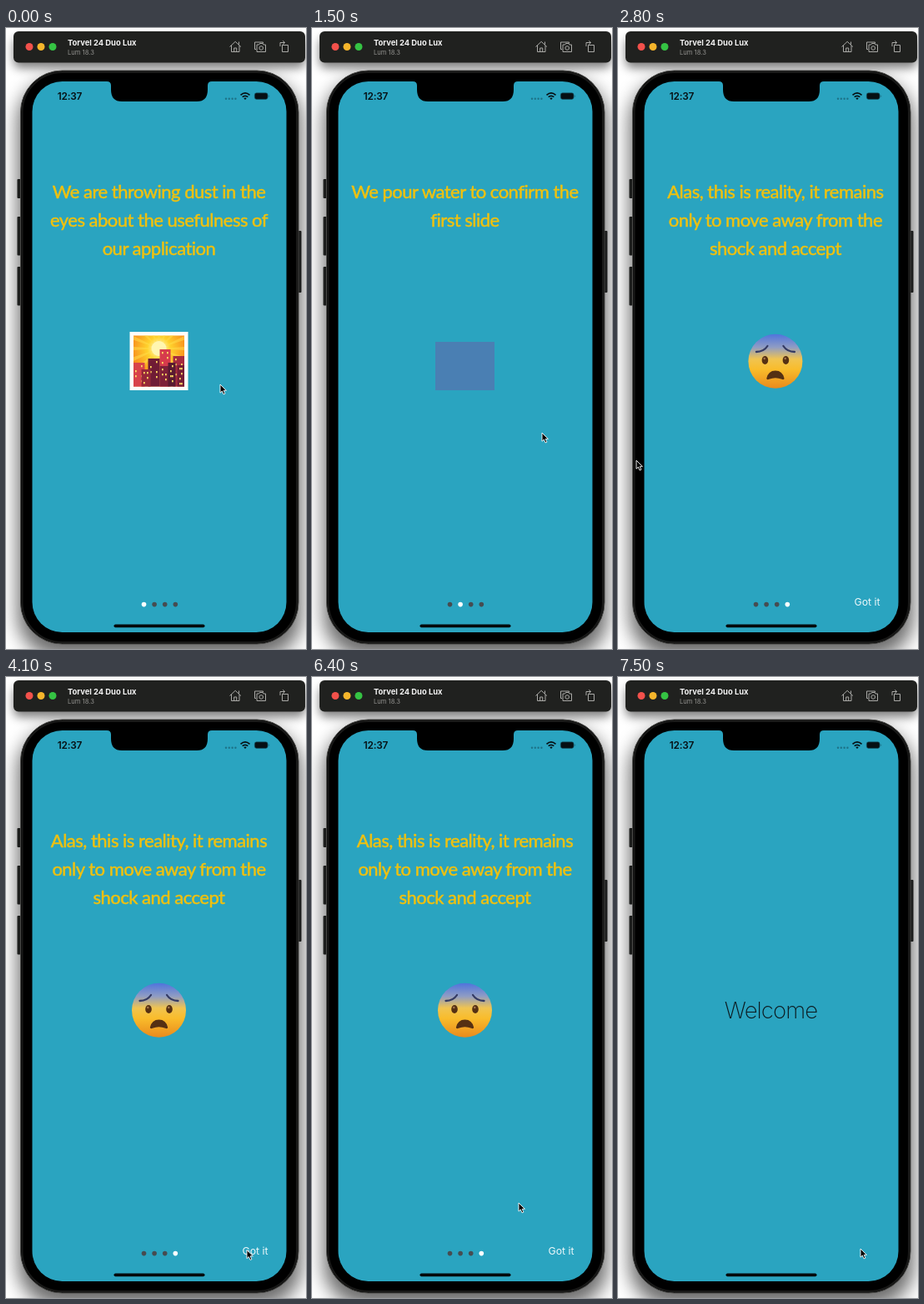
Write an HTML page that moves like this. It is 360 px wide and 744 px high and loops after 8 s.

```html
<!DOCTYPE html>
<html lang="en">
<head>
<meta charset="utf-8">
<title>Onboarding slides</title>
<style>
  html, body { margin: 0; width: 100%; height: 100%; overflow: hidden; background: #fff; }
  svg { display: block; width: 360px; height: 744px; }
  text { font-family: Inter, "Open Sans", sans-serif; }
  .title { font: 22px Lato, sans-serif; letter-spacing: -.5px; text-anchor: middle;
           fill: #f0c10f; stroke: #f0c10f; stroke-width: .5px; }
  .icon { fill: none; stroke: #a9a9a6; stroke-width: 1; stroke-linejoin: round; }
</style>
</head>
<body>
<svg viewBox="0 0 360 744">
  <defs>
    <filter id="blur" x="-30%" y="-30%" width="160%" height="160%"><feGaussianBlur stdDeviation="11"/></filter>
    <filter id="soft" x="-20%" y="-100%" width="140%" height="300%"><feGaussianBlur stdDeviation="6"/></filter>
    <clipPath id="screen"><rect x="31.5" y="64" width="305" height="660" rx="36"/></clipPath>
    <clipPath id="photo"><rect x="4.5" y="4.5" width="61" height="61"/></clipPath>
    <radialGradient id="sun" gradientUnits="userSpaceOnUse" cx="35" cy="20" r="46">
      <stop offset=".1" stop-color="#fff7b5"/><stop offset=".3" stop-color="#ffd22c"/>
      <stop offset=".7" stop-color="#f8921e"/><stop offset="1" stop-color="#e9581c"/>
    </radialGradient>
    <linearGradient id="skin" x2="0" y2="1">
      <stop offset="0" stop-color="#4f74dc"/><stop offset=".24" stop-color="#8f9cc4"/>
      <stop offset=".46" stop-color="#f0c450"/><stop offset=".65" stop-color="#f9bc2b"/>
      <stop offset="1" stop-color="#e98a1c"/>
    </linearGradient>
    <linearGradient id="rock" x2="1">
      <stop offset="0" stop-color="#68656a"/><stop offset=".5" stop-color="#3f3e44"/>
      <stop offset="1" stop-color="#5d5a5f"/>
    </linearGradient>
    <linearGradient id="lava" x2="0" y2="1">
      <stop offset="0" stop-color="#f0452a"/><stop offset=".4" stop-color="#ff7a1e"/>
      <stop offset="1" stop-color="#f7941d"/>
    </linearGradient>
  </defs>

  <!-- shadows and window bar -->
  <rect x="14" y="62" width="341" height="692" rx="50" opacity=".58" filter="url(#blur)"/>
  <rect x="9" y="12" width="350" height="36" rx="8" opacity=".5" filter="url(#soft)"/>
  <rect x="9" y="4" width="350" height="37.5" rx="6" fill="#20211f"/>
  <circle cx="28" cy="22.5" r="4.5" fill="#f2514b"/>
  <circle cx="42" cy="22.5" r="4.5" fill="#f5b52b"/>
  <circle cx="56" cy="22.5" r="4.5" fill="#35c343"/>
  <text x="74" y="21.3" font-size="9.4" font-weight="700" fill="#f4f4f4">Torvel 24 Duo Lux</text>
  <text x="74" y="31.6" font-size="7.6" fill="#92928f">Lum 18.3</text>
  <g class="icon">
    <path d="M268.5 22.5l6.7-6.2 6.7 6.2M270.5 21v7.5h9.500v-7.500M273.700 28.500v-4.500h3v4.500M279.500 19.800v-3.300"/>
    <path d="M300 25.500h-1.500v-8.500h10v1.500"/>
    <path d="M301 20h2.500l1-1.500h3.500l1 1.500h2.500v8.500h-10.500z"/><circle cx="306.200" cy="24" r="2.300"/>
    <path d="M331.500 20.500h7v8h-7zM329 22v-4.500h5.500M332.300 15.300l2.300 2.200-2.300 2.200"/>
  </g>

  <!-- phone -->
  <g fill="#1c1d1c">
    <rect x="13.500" y="181" width="5" height="23" rx="1"/><rect x="13.500" y="226" width="5" height="46.500" rx="1"/>
    <rect x="13.500" y="286" width="5" height="46.500" rx="1"/><rect x="350" y="243" width="4.500" height="74" rx="1"/>
  </g>
  <rect x="17.500" y="51" width="333.500" height="687" rx="50" fill="#000" stroke="#4a4a48"/>
  <rect x="19.500" y="53" width="329.500" height="683" rx="48" fill="none" stroke="#191918" stroke-width="2"/>
  <g clip-path="url(#screen)">
    <rect x="31" y="64" width="306" height="660" fill="#2aa4c0"/>
    <g id="deck">
      <g id="pages">
        <g id="city" transform="translate(148.500 364)">
          <rect width="70" height="70" fill="#fffdf8"/>
          <g clip-path="url(#photo)">
            <rect width="70" height="70" fill="url(#sun)"/>
            <g id="rays" fill="#ffdd4a" opacity=".55"></g>
            <circle cx="35" cy="20" r="9" fill="#fff6b0"/>
            <g id="blocks"></g>
          </g>
        </g>
        <rect x="453" y="376" width="71" height="58" fill="#4a7fb3"/>
        <g transform="translate(610)">
          <path d="M148 431L166 407 175 390 193 390 204 408 218 430 Q184 436 148 431z" fill="url(#rock)"/>
          <path d="M186 398l4 12-3 22h14l-5-18zM168 407l-3 14-14 9z" fill="#2d2c32"/>
          <path d="M201 406l4 12 8 11-4-13zM193 400l6 14 1 9 3-7z" fill="#85817f"/>
          <path d="M174 392l4-13 3 4 3-10 3 9 4-4 2 13-1 7-3 1 1 9-4-7-3 6-6 11-2 13-11 1 6-16 5-12-6 9z" fill="url(#lava)"/>
          <path d="M181 390l3-9 3 9-3 13-4 3z" fill="#ffc23a"/>
          <g fill="#e4e5e9">
            <path d="M148 366q9 1 15 0 8-1 13 5l-2 9q-7-5-13-4 1-4-6-4l4-2z"/>
            <circle cx="173" cy="374" r="7"/><circle cx="183" cy="370" r="6"/><circle cx="190" cy="374" r="6"/>
            <circle cx="192" cy="381" r="5"/><circle cx="172" cy="382" r="4.500"/>
          </g>
          <path d="M166 375q5 5 9 1 5 4 9 0 4 4 9 0" fill="none" stroke="#b4b6bd" stroke-width="1.800"/>
        </g>
        <g transform="translate(915)">
          <circle cx="183.500" cy="399.300" r="32.500" fill="url(#skin)"/>
          <g fill="none" stroke="#343a63" stroke-width="2.300" stroke-linecap="round">
            <path d="M160.500 388q9 0 13.500-7M206.500 388q-9 0-13.500-7"/>
          </g>
          <g fill="#553013">
            <ellipse cx="171" cy="398" rx="3.800" ry="5"/><ellipse cx="196" cy="398" rx="3.800" ry="5"/>
            <path d="M172.800 420q2-9.500 10.700-9.500t10.700 9.500q-1 2-3 .8-7.700-3-15.400 0-2 1.200-3-.8z"/>
          </g>
          <g fill="#a9794d"><circle cx="170.300" cy="396" r="1.200"/><circle cx="195.300" cy="396" r="1.200"/></g>
        </g>
      </g>
      <g id="dots"></g>
      <text id="done" x="299" y="692" font-size="12.300" text-anchor="middle" fill="#eef8fa">Got it</text>
    </g>
    <text id="welcome" x="183.500" y="408.700" font-size="27.500" font-weight="200" letter-spacing="-.9"
          text-anchor="middle" fill="#0c1b20">Welcome</text>
    <path d="M121 63v1q5 0 5 5v5q0 14 13 14h90q13 0 13-14v-5q0-5 5-5v-1z"/>
    <text x="76.500" y="86" font-size="11.800" font-weight="600" letter-spacing="-.2" text-anchor="middle" fill="#061014">12:37</text>
    <g fill="#1d7388">
      <circle cx="264" cy="84.700" r="1.200"/><circle cx="267.800" cy="84.700" r="1.200"/>
      <circle cx="271.600" cy="84.700" r="1.200"/><circle cx="275.400" cy="84.700" r="1.200"/>
    </g>
    <g fill="none" stroke="#061014" stroke-width="1.700">
      <path d="M281.500 80.300q5.500-4.800 11 0M283.700 82.700q3.300-2.800 6.600 0"/>
    </g>
    <path d="M285.300 84.200q1.700-1.300 3.400 0l-1.700 1.900z" fill="#061014"/>
    <rect x="298.300" y="77.800" width="15.800" height="7.600" rx="2.300" fill="#061014" stroke="#17596a" stroke-width=".6"/>
    <path d="M315.500 80.200q1.500 1.400 0 2.800z" fill="#17596a"/>
    <rect x="129.500" y="714.500" width="109" height="3.700" rx="1.850" fill="#04090b"/>
  </g>
  <path id="cursor" d="M0 0v10.200l2.300-2.200 1.700 3.900 1.900-.8-1.700-3.800h3.200z" fill="#000" stroke="#fff" stroke-width=".9"/>
</svg>
<script>
const $ = id => document.getElementById(id);
const WIDTH = 305, CENTER = 183.5;

function add(parent, tag, attrs, text = '') {
  const el = document.createElementNS('http://www.w3.org/2000/svg', tag);
  for (const k in attrs) el.setAttribute(k, attrs[k]);
  el.textContent = text;
  parent.append(el);
  return el;
}

const titles = [
  ['We are throwing dust in the', 'eyes about the usefulness of', 'our application'],
  ['We pour water to confirm the', 'first slide'],
  ['Congratulations you can take', 'a closer look at a piece of dirt'],
  ['Alas, this is reality, it remains', 'only to move away from the', 'shock and accept']
];
titles.forEach((lines, page) => lines.forEach((line, i) =>
  add($('pages'), 'text', { class: 'title', x: CENTER + page * WIDTH, y: 204 + 34 * i }, line)));

const dots = titles.map((_, i) => add($('dots'), 'circle', { cx: 165.5 + 12.6 * i, cy: 690.6, r: 2.8 }));

for (let i = 0; i < 16; i++)
  add($('rays'), 'path', { d: 'M35 20L80 17v6z', transform: `rotate(${i * 22.5} 35 20)` });

// x, top, width, colour of each building
[[4, 37, 14, '#d8434a'], [36, 21, 13, '#d63b4c'], [52, 29, 14, '#a62c3f'], [22, 32, 14, '#6f1c35'],
 [14, 45, 11, '#962839'], [36, 41, 11, '#7d2039'], [46, 37, 9, '#591a31'], [57, 40, 9, '#741d36']
].forEach(([x, y, w, fill], n) => {
  add($('blocks'), 'rect', { x, y, width: w, height: 66 - y, fill });
  for (let i = 0; i < 8; i++) {
    const wy = y + 3 + (i >> 1) * 6;
    if ((i + n) % 3 && wy < 62)
      add($('blocks'), 'rect', { x: x + 2.5 + (i % 2) * (w - 7), y: wy, width: 1.7, height: 2.3, fill: '#ffdc62' });
  }
});

// time followed by values
const pageKeys = [[100, 0], [750, 1], [1800, 1], [2250, 2], [2450, 2], [2830, 3], [4750, 3], [5380, 2], [5900, 2], [6350, 3]];
const cursorKeys = [
  [0, 257, 427], [100, 257, 427], [500, 70, 440], [900, 60, 445], [1500, 276, 485], [1750, 276, 485],
  [2100, 60, 500], [2400, 285, 506], [2800, 22, 518], [3000, 24, 522], [3500, 116, 570], [4100, 289, 686.5],
  [4350, 289, 686.5], [4750, 80, 590], [5200, 300, 580], [5400, 306, 578], [5850, 306, 578],
  [6150, 26, 605], [6400, 248, 630], [6700, 289, 685], [6800, 291, 685]
];

function sample(keys, t) {
  const i = keys.findIndex(k => k[0] > t);
  if (i === 0) return keys[0].slice(1);
  if (i < 0) return keys[keys.length - 1].slice(1);
  const a = keys[i - 1], b = keys[i];
  const p = (t - a[0]) / (b[0] - a[0]), e = p * p * (3 - 2 * p);
  return a.slice(1).map((v, j) => v + (b[j + 1] - v) * e);
}

function draw(now) {
  const t = Math.floor(now % 8000 / 100) * 100;
  const [page] = sample(pageKeys, t), [x, y] = sample(cursorKeys, t);
  const current = Math.round(page);
  const fade = Math.min(1, Math.max(0, (t - 6900) / 500));
  $('pages').setAttribute('transform', `translate(${-page * WIDTH})`);
  dots.forEach((dot, i) => dot.setAttribute('fill', i === current ? '#fff' : '#464c51'));
  $('done').style.opacity = current === 3 ? 1 : 0;
  $('deck').style.opacity = 1 - fade;
  $('welcome').style.opacity = fade;
  $('cursor').setAttribute('transform', `translate(${x} ${y})`);
  requestAnimationFrame(draw);
}
draw(performance.now());
</script>
</body>
</html>
```
